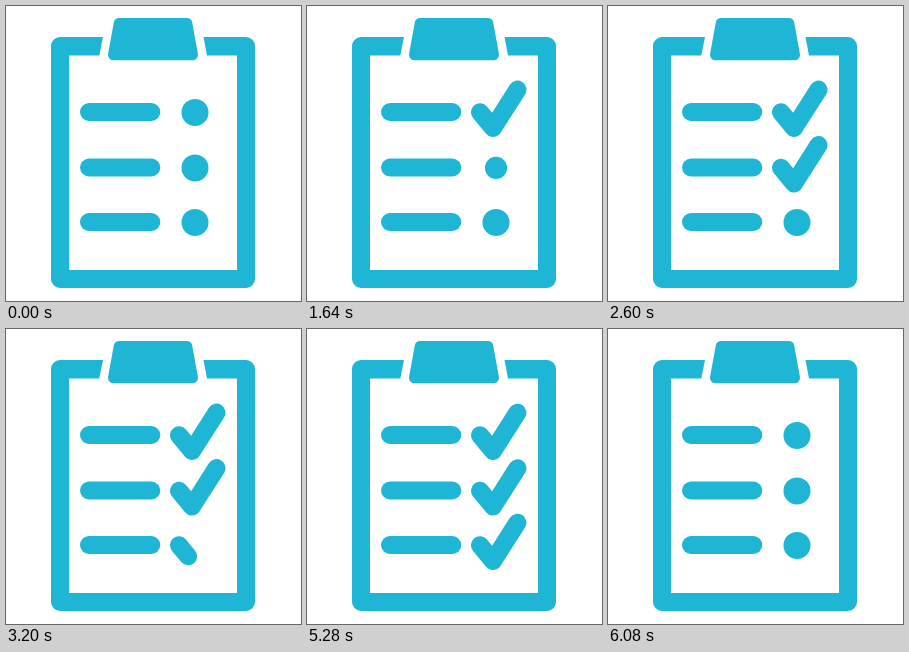
Write an HTML page that moves like this. It is 295 px wide and 295 px high and loops after 6.2 s.

```html
<!DOCTYPE html>
<html lang="en">
<head>
<meta charset="utf-8">
<title>Checklist</title>
<style>
  html, body { margin: 0; width: 100%; height: 100%; overflow: hidden; background: #fff; }
  svg { display: block; width: 100%; height: 100%; }
</style>
</head>
<body>
<svg viewBox="0 0 295 295" fill="#1fb6d5">
  <path d="M97 31H54a9 9 0 0 0-9 9V273a9 9 0 0 0 9 9H240a9 9 0 0 0 9-9V40a9 9 0 0 0-9-9H197.5L201 49.5H231V264H63V49.5H93.3Z"/>
  <path d="M113.2 17.5H180.8L186.5 48.8H107.5Z" stroke="#1fb6d5" stroke-width="11" stroke-linejoin="round"/>
  <g id="rows" stroke="#1fb6d5" stroke-width="18" stroke-linecap="round" stroke-linejoin="round"></g>
</svg>
<script>
const LOOP = 6200;
const ROW_GAP = 1320;
const ROW_Y = [0, 55.5, 110];
const ROW_START = 40, ROW_END = 1280;
const RESET_START = 5240, RESET_END = 6080;
const DOT = { start: 40, end: 520, r: 13.5 };
const CHECK = { start: 480, end: 1280 };
const [A, B, C] = [[173, 106.2], [186, 122], [210.5, 83.6]];

const clamp = (v, lo, hi) => Math.min(hi, Math.max(lo, v));
const span = (t, { start, end }) => clamp((t - start) / (end - start), 0, 1);
const dist = (p, q) => Math.hypot(q[0] - p[0], q[1] - p[1]);
const mix = (p, q, k) => [p[0] + (q[0] - p[0]) * k, p[1] + (q[1] - p[1]) * k];

// cubic-bezier(.167, 0, 0, 1), solved by bisection
function easeOut(x) {
  if (x <= 0 || x >= 1) return clamp(x, 0, 1);
  let lo = 0, hi = 1;
  for (let i = 0; i < 30; i++) {
    const s = (lo + hi) / 2;
    if (0.5 * (1 - s) ** 2 * s + s ** 3 < x) lo = s; else hi = s;
  }
  return 3 * (1 - lo) * lo * lo + lo ** 3;
}

function add(parent, tag, attrs) {
  const el = document.createElementNS("http://www.w3.org/2000/svg", tag);
  for (const k in attrs) el.setAttribute(k, attrs[k]);
  return parent.appendChild(el);
}

const rows = ROW_Y.map(y => {
  const g = add(document.getElementById("rows"), "g", { transform: `translate(0 ${y})` });
  add(g, "path", { d: "M83 106H145.3" });
  return {
    dot: add(g, "circle", { cx: 189, cy: 106.4, r: DOT.r, stroke: "none" }),
    check: add(g, "path", { fill: "none" })
  };
});

const shortArm = dist(A, B), longArm = dist(B, C);

function checkPath(k) {
  const len = k * (shortArm + longArm);
  if (len < 0.01) return "";
  if (len <= shortArm) return `M${A}L${mix(A, B, len / shortArm)}`;
  return `M${A}L${B}L${mix(B, C, (len - shortArm) / longArm)}`;
}

function draw(t) {
  const back = (t - RESET_START) / (RESET_END - RESET_START);
  rows.forEach(({ dot, check }, i) => {
    // the reset plays every row backwards at once, faster
    const u = back > 0 ? ROW_END - back * (ROW_END - ROW_START) : t - i * ROW_GAP;
    dot.setAttribute("r", DOT.r * easeOut(1 - span(u, DOT)));
    check.setAttribute("d", checkPath(easeOut(span(u, CHECK))));
  });
}

const began = performance.now();
function tick() {
  draw((performance.now() - began) % LOOP);
  requestAnimationFrame(tick);
}
draw(0);
requestAnimationFrame(tick);
</script>
</body>
</html>
```
